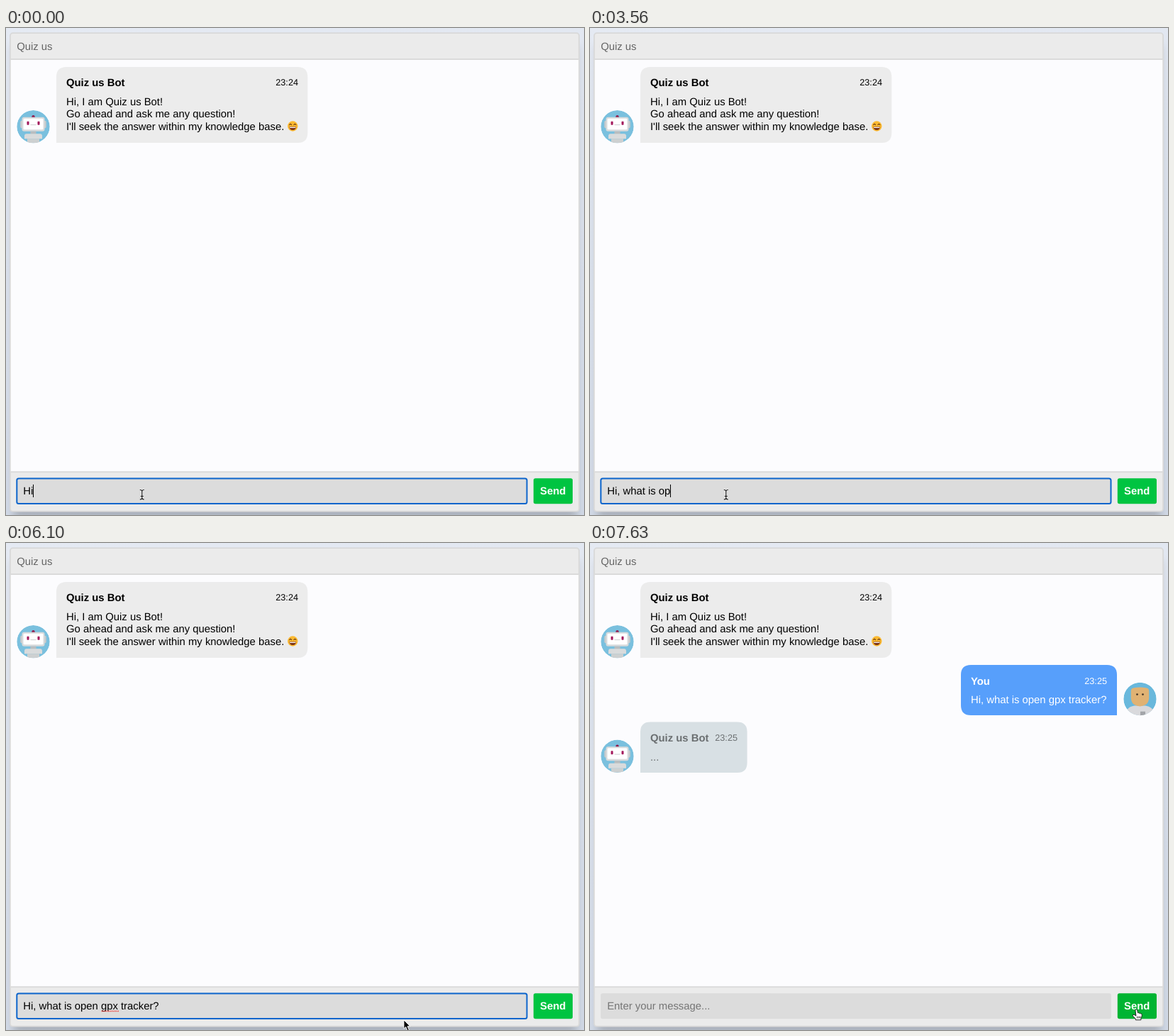
An HTML page that plays this animation: 815 px wide and 687 px high, repeating every 8 s.

```html
<!DOCTYPE html>
<html lang="en">
<head>
<meta charset="utf-8">
<title>Chat</title>
<style>
  html, body { margin: 0; width: 100%; height: 100%; overflow: hidden; background: #dfe5ef; }
  svg { display: block; width: 100%; height: 100%; }
  text {
    font: 14.85px "Liberation Sans", Arial, Helvetica, sans-serif;
    text-rendering: geometricPrecision;
    white-space: pre;
  }
  .bold { font-weight: 700; }
  .time { font-size: 12.7px; text-anchor: end; }
  .light { fill: #fff; }
  .muted { fill: #6b6f71; }
</style>
</head>
<body>
<svg viewBox="0 0 815 687" xmlns="http://www.w3.org/2000/svg">
  <defs>
    <linearGradient id="page" x1="0" y1="0" x2="0.15" y2="1">
      <stop offset="0" stop-color="#e5eaf3"/>
      <stop offset="1" stop-color="#d3dbe8"/>
    </linearGradient>
    <filter id="blur" x="-10%" y="-10%" width="120%" height="120%">
      <feGaussianBlur stdDeviation="6.5"/>
    </filter>
    <clipPath id="disc"><circle r="23.2"/></clipPath>

    <g id="bot" clip-path="url(#disc)">
      <circle r="23.2" fill="#7ac0de"/>
      <circle cy="-14" r="2.2" fill="#8f1d4e"/>
      <rect x="-18.3" y="-8.5" width="36.6" height="10.5" rx="2" fill="#c6cacc"/>
      <rect x="-16" y="-13.5" width="32" height="20" rx="3" fill="#d9dbdc"/>
      <rect x="-14" y="-11.5" width="28" height="15.5" rx="1.5" fill="#fff"/>
      <rect x="-9" y="-7.5" width="3" height="5" rx="0.8" fill="#a3195b"/>
      <rect x="6" y="-7.5" width="3" height="5" rx="0.8" fill="#a3195b"/>
      <path d="M-4 -2.6H4" stroke="#c9c9cb" stroke-width="0.9"/>
      <rect x="-4" y="6.5" width="8" height="4" fill="#b9bdbf"/>
      <path d="M-12.5 17V13q0-3 3-3H9.5q3 0 3 3v4z" fill="#d9dbdc"/>
      <rect x="-8.5" y="17" width="17" height="6" fill="#cdd0d1"/>
    </g>

    <g id="user" clip-path="url(#disc)">
      <circle r="23.2" fill="#69b8dc"/>
      <path d="M-20 24V20Q-18 11 -8 9.5H8Q18 11 20 20V24z" fill="#d9d9dc"/>
      <path d="M-12.7-11Q-12.7-15.5-8-15.8Q0-17 8-15.8Q12.7-15.5 12.7-11V-1Q12 6 7.5 8.3Q0 12.5-7.5 8.3Q-12 6-12.7-1z" fill="#e0b273"/>
      <circle cx="-4" cy="-6.4" r="1.4" fill="#493a2b"/>
      <circle cx="4" cy="-6.4" r="1.4" fill="#493a2b"/>
      <rect x="0.5" y="17.7" width="7" height="6" fill="#a3a5a9"/>
    </g>
  </defs>

  <rect width="815" height="687" fill="url(#page)"/>
  <rect x="10" y="25" width="795" height="667" fill="#000" opacity="0.2" filter="url(#blur)"/>

  <!-- Window -->
  <rect x="5" y="6.3" width="804" height="676.5" rx="4.6" fill="#d9d9d9"/>
  <rect x="6.8" y="8.1" width="800.4" height="673" rx="3" fill="#ebebeb"/>
  <rect x="6.8" y="43.2" width="800.4" height="584" fill="#d9d9d9"/>
  <rect x="6.8" y="45" width="800.4" height="580.3" fill="#fcfcfe"/>
  <text x="15.2" y="31" fill="#666">Quiz us</text>

  <!-- Greeting -->
  <use href="#bot" x="38.5" y="139.2"/>
  <path d="M71 162V69q0-14 14-14H411.3q14 0 14 14V148q0 14-14 14z" fill="#ececec"/>
  <text class="bold" x="85" y="82.2">Quiz us Bot</text>
  <text class="time" x="412" y="81.3">23:24</text>
  <text x="85" y="108.7">Hi, I am Quiz us Bot!</text>
  <text x="85" y="126.3">Go ahead and ask me any question!</text>
  <text x="85" y="144.1">I'll seek the answer within my knowledge base.</text>
  <g transform="translate(404.3 138.5)" fill="none" stroke-linecap="round">
    <circle r="7.2" fill="#fbb931"/>
    <path d="M-4.6-1.8Q-3.2-4.4-1.6-1.8M1.6-1.8Q3.2-4.4 4.6-1.8" stroke="#6b3a12" stroke-width="1.1"/>
    <path d="M-5 .8H5Q4.4 5.6 0 5.6T-5 .8z" fill="#7a3215"/>
    <path d="M-4.4 1.2H4.4L4 2.6H-4z" fill="#fff"/>
  </g>

  <!-- Question -->
  <g id="question">
    <path d="M743 243H537q-14 0-14-14V186q0-14 14-14H729q14 0 14 14z" fill="#579ffb"/>
    <text class="bold light" x="537" y="199.7">You</text>
    <text class="time light" x="729" y="198.8">23:25</text>
    <text class="light" x="537" y="226.2">Hi, what is open gpx tracker?</text>
    <use href="#user" x="775.5" y="220"/>
  </g>

  <!-- Pending reply -->
  <g id="reply">
    <use href="#bot" x="38.5" y="300.7"/>
    <path d="M71 324V266.6q0-14 14-14H207.6q14 0 14 14V310q0 14-14 14z" fill="#d8e0e4"/>
    <text class="bold muted" x="85" y="280.3">Quiz us Bot</text>
    <text class="time muted" x="208" y="279.4">23:25</text>
    <text class="muted" x="85" y="307">...</text>
  </g>

  <!-- Input row -->
  <rect x="15" y="635.3" width="719.8" height="36" rx="2.8" fill="#dcdcdc"/>
  <rect id="focus" x="15.3" y="635.5" width="719.2" height="35.6" rx="2.6" fill="none" stroke="#0d65cc" stroke-width="2"/>
  <text id="hint" x="24.2" y="658.2" fill="#757575">Enter your message...</text>
  <text id="typed" x="24.2" y="658.2"></text>
  <path id="squiggle" d="M135.5 660.4H158" stroke="#f0453f" stroke-width="1.9" stroke-linecap="round" stroke-dasharray="0 2.8"/>
  <rect id="caret" y="644" width="1" height="18"/>
  <rect id="button" x="743.8" y="635.3" width="55.2" height="36" rx="2.8"/>
  <text class="bold light" x="753" y="658.2">Send</text>

  <!-- Pointers, each drawn from its top or tip -->
  <g id="beam" fill="none">
    <path d="M-3 .5Q0 .5 0 2.5Q0 .5 3 .5M0 2V12.5M-3 14Q0 14 0 12Q0 14 3 14M-2 9.5H2" stroke="#fff" stroke-opacity="0.6" stroke-width="2.4"/>
    <path d="M-3 .5Q0 .5 0 2.5Q0 .5 3 .5M0 2V12.5M-3 14Q0 14 0 12Q0 14 3 14M-2 9.5H2" stroke="#111" stroke-width="1.1"/>
  </g>
  <path id="arrow" d="M0 0V12.2L2.8 9.6L5.1 15L7.3 14L5 8.8H8.8z" fill="#000" stroke="#fff" stroke-width="0.9"/>
  <path id="hand" d="M-1.6 1.2Q0-.6 1.2 1.2L2 5.4Q3.4 4.6 4.2 6Q5.6 5.2 6.2 6.7Q7.6 6.3 7.8 8Q7.8 10.8 6.4 13V15.3H-1.2V13.6L-5.3 9.4Q-5.7 7.4-3.4 7.8L-.6 9.6zM1.2 10.2V13M3.3 10.2V13M5.2 10.2V12.8" fill="#fff" stroke="#111" stroke-width="0.9" stroke-linejoin="round"/>
</svg>
<script>
  const LOOP = 8000;
  const TEXT_X = 24.2;
  const SENT = 7120, REPLY = 7630, MISSPELT = 4580, POINTER_LEAVES = 6100, AT_BUTTON = 6610;
  const MESSAGE = "Hi, what is open gpx tracker?";

  // [time, number of typed characters]
  const KEYS = [[0, 2], [1020, 4], [2550, 9], [3050, 12], [3560, 14], [4070, 18],
                [4580, 21], [5090, 26], [5590, 29]];
  const CARET_OFF = [[1530, 2040], [6100, 6610]];

  const $ = id => document.getElementById(id);
  const show = (id, on) => $(id).setAttribute("visibility", on ? "visible" : "hidden");
  const place = (id, x, y) => $(id).setAttribute("transform", `translate(${x} ${y})`);
  const within = (t, [from, to]) => t >= from && t < to;

  function render(t) {
    const sent = t >= SENT;
    const count = KEYS.filter(([at]) => at <= t).pop()[1];
    const typed = $("typed");
    typed.textContent = sent ? "" : MESSAGE.slice(0, count);

    show("focus", !sent);
    show("hint", sent);
    show("question", sent);
    show("reply", t >= REPLY);
    show("squiggle", within(t, [MISSPELT, SENT]));
    show("caret", !sent && !CARET_OFF.some(gap => within(t, gap)));
    $("caret").setAttribute("x", Math.round(TEXT_X + typed.getComputedTextLength()));
    $("button").setAttribute("fill", sent ? "#00b432" : "#00c441");

    show("beam", t < POINTER_LEAVES);
    show("arrow", within(t, [POINTER_LEAVES, SENT]));
    show("hand", sent);
    if (t < AT_BUTTON) place("arrow", 561, 673);
    else place("arrow", 740, 661);
  }

  place("beam", 191.8, 651);
  place("hand", 770.5, 657.5);

  const start = performance.now();
  function tick() {
    render((performance.now() - start) % LOOP);
    requestAnimationFrame(tick);
  }
  tick();
</script>
</body>
</html>
```
